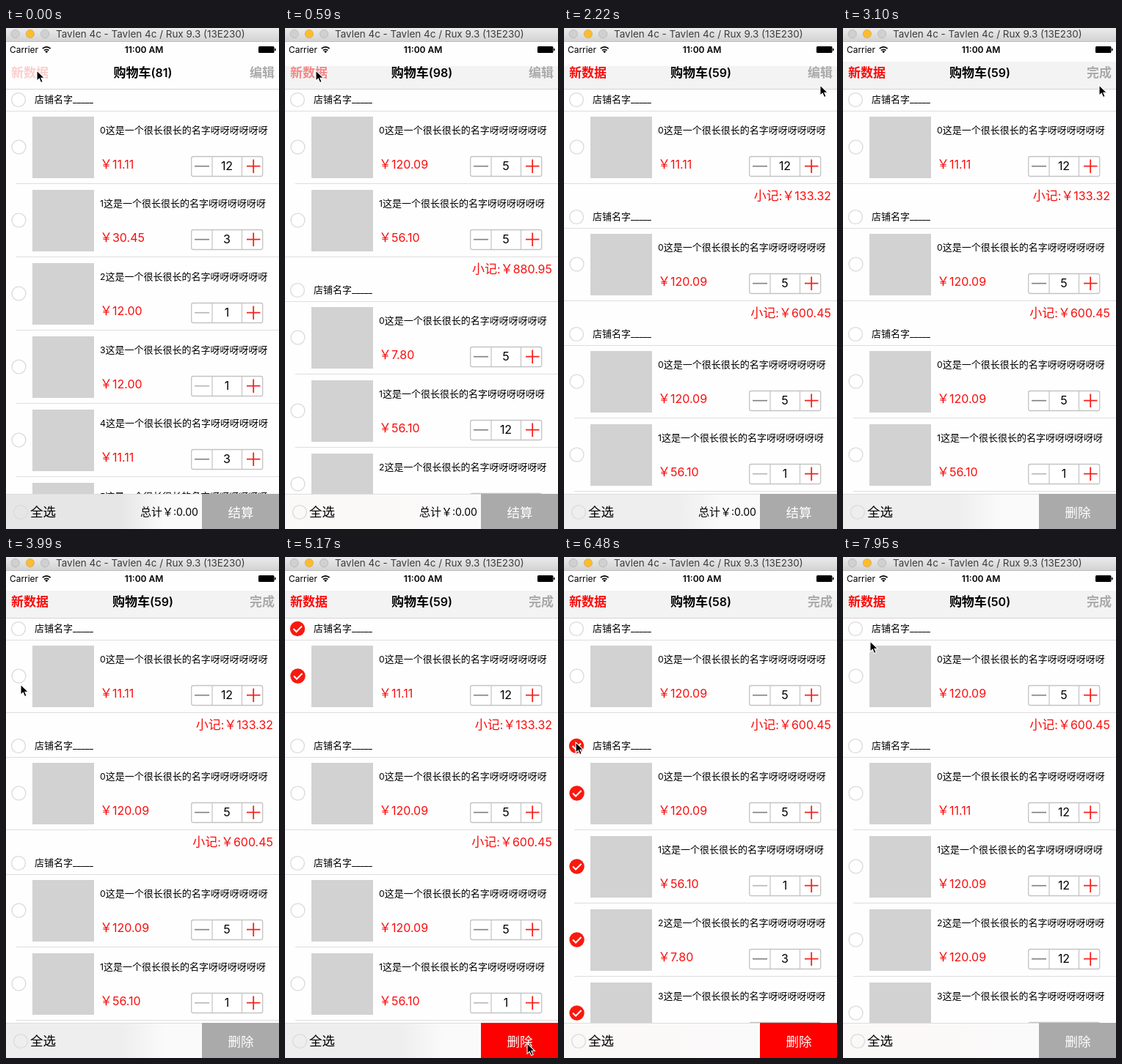
Write an HTML page that moves like this. It is 372 px wide and 684 px high and loops after 8000 ms.

```html
<!DOCTYPE html>
<html lang="zh-CN">
<head>
<meta charset="utf-8">
<title>购物车</title>
<style>
html, body { margin: 0; width: 100%; height: 100%; overflow: hidden; background: #fff; }
svg { display: block; font-family: Inter, "Noto Sans CJK SC", "Noto Sans CJK", sans-serif; }
text { white-space: pre; }
</style>
</head>
<body>
<svg id="stage" width="372" height="684" viewBox="0 0 372 684"></svg>
<script>
const LOOP = 8000, STEP = 147.4, TRAVEL = 4;
const W = 372, ROW = 100, HEAD = 30, LIST_TOP = 83, BAR_TOP = 636;
const RED = '#fb0d0d', LINE = '#dedede', PALE = '#fbf8f8';
const stage = document.getElementById('stage');

// A shop is a list of "price x quantity" items.
const shop = items => items.split(' ').map(item => item.split('x').map(Number));
const carts = [
  { count: 81, tint: '#e6e6e6', shops: ['11.11x12 30.45x3 12x1 12x1 11.11x3 7.8x5'].map(shop) },
  { count: 98, tint: PALE, shops: ['120.09x5 56.1x5', '7.8x5 56.1x12 12x3'].map(shop) },
  { count: 59, tint: '#eeeeee', shops: ['11.11x12', '120.09x5',
      '120.09x5 56.1x1 7.8x3 12x3 12x1 12x1 11.11x3 7.8x5',
      '11.11x12 120.09x12 120.09x12 12x3'].map(shop) }
];

// What the user does, and at which step.
const refreshPresses = [0, 3, 9];
const editPress = 18;
const removals = [{ check: 29, remove: 36, index: 0 }, { check: 43, remove: 50, index: 1 }];
const visits = [
  { arrive: 0, x: 42, y: 58 }, { arrive: 15, x: 349, y: 78 }, { arrive: 25, x: 20, y: 174 },
  { arrive: 33, x: 330, y: 664 }, { arrive: 41, x: 16, y: 253 }, { arrive: 48, x: 330, y: 664 },
  { arrive: 54, x: 37, y: 115 }
];

const clamp = u => Math.max(0, Math.min(1, u));
const ease = u => u * u * (3 - 2 * u);
const fadeAfter = (press, step) => step < press ? 1 : .2 + .8 * clamp((step - press) / 3);

function pointerAt(step) {
  return visits.reduce((p, { arrive, x, y }) => {
    const u = ease(clamp((step - arrive + TRAVEL) / TRAVEL));
    return arrive ? { x: p.x + (x - p.x) * u, y: p.y + (y - p.y) * u } : { x, y };
  }, {});
}

function stateAt(step) {
  const refreshes = refreshPresses.filter(press => press && step > press).length;
  let { count, tint, shops } = carts[refreshes], checked = -1;
  for (const { check, remove, index } of removals) {
    if (step >= remove) {
      count -= shops[index].length;
      shops = shops.filter((_, i) => i !== index);
      tint = PALE;
    } else if (step >= check) checked = index;
  }
  const lastPress = refreshPresses.filter(press => press <= step).pop();
  return {
    count, tint, shops, checked,
    editing: step > editPress,
    navFill: refreshes ? '#f3f3f3' : '#fefefe',
    refreshAlpha: fadeAfter(lastPress, step),
    editAlpha: fadeAfter(editPress, step),
    pointer: pointerAt(step)
  };
}

const rect = (x, y, w, h, fill, extra = '') =>
  `<rect x="${x}" y="${y}" width="${w}" height="${h}" fill="${fill}" ${extra}/>`;
const rule = (y, x = 0, color = LINE) => rect(x, y, W - x, 1, color);
const path = (d, stroke, width) =>
  `<path d="${d}" fill="none" stroke="${stroke}" stroke-width="${width}"/>`;
const gradient = (id, stops, extra = '') => `<linearGradient id="${id}" ${extra}>` +
  stops.map(([offset, color]) => `<stop offset="${offset}" stop-color="${color}"/>`).join('') +
  '</linearGradient>';

// Latin runs are set slightly smaller than the Chinese around them.
function text(x, y, size, str, { fill = '#000', anchor = 'start', weight = 400, alpha = 1 } = {}) {
  const body = str.replace(/[\x20-\x7e]+/g, run => `<tspan font-size="${size * .94}">${run}</tspan>`);
  return `<text x="${x}" y="${y}" font-size="${size}" fill="${fill}" text-anchor="${anchor}"
    font-weight="${weight}" opacity="${alpha}">${body}</text>`;
}

const ring = (x, y, fill) =>
  `<circle cx="${x}" cy="${y}" r="9.4" fill="${fill}" stroke="#dcdcdc" stroke-width="1.4"/>`;

function tick(x, y, on) {
  if (!on) return ring(x, y, '#fff');
  return `<circle cx="${x}" cy="${y}" r="10.2" fill="#f9190f"/>` +
    path(`M${x - 5.5} ${y}l4 4l7.5 -7.5`, '#fff', 2);
}

function stepper(y, quantity) {
  const mid = y + 13.7;
  return rect(252.7, y + .5, 97, 27, '#fff', 'rx="2.5" stroke="#c4c4c4" stroke-width="1.3"') +
    path(`M281 ${y}v28M321.5 ${y}v28`, '#c4c4c4', 1.2) +
    path(`M257 ${mid}h20`, quantity > 1 ? '#858585' : '#b8b8b8', 1.7) +
    path(`M328 ${mid}h18.5M337.2 ${mid - 9.2}v18.5`, '#f5221d', 1.8) +
    text(301, y + 19, 17, String(quantity), { anchor: 'middle' });
}

function itemRow(y, index, [price, quantity], on, last) {
  return tick(17.5, y + 49.5, on) +
    rect(36, y + 8, 84, 84, '#d2d2d2') +
    text(128, y + 31, 13, index + '这是一个很长很长的名字' + '呀'.repeat(6)) +
    text(128, y + 79, 17, '￥' + price.toFixed(2), { fill: RED }) +
    stepper(y + 62, quantity) +
    rule(y + ROW - 1, last ? 0 : 14);
}

function cartList(shops, checked) {
  let y = LIST_TOP, out = '';
  shops.forEach((items, s) => {
    const on = s === checked;
    out += tick(17, y + 15, on) + text(39, y + 19, 13, '店铺名字_____') + rule(y + HEAD);
    y += HEAD;
    items.forEach((item, i) => {
      out += itemRow(y, i, item, on, i === items.length - 1);
      y += ROW;
    });
    const sum = items.reduce((total, [price, quantity]) => total + price * quantity, 0);
    out += text(364, y + 22, 17, '小记:￥' + sum.toFixed(2), { fill: RED, anchor: 'end' });
    y += HEAD;
  });
  return out;
}

function windowBar() {
  const lights = ['#d0d0d0', '#fdbc2e', '#d0d0d0'].map((fill, i) =>
    `<circle cx="${12.7 + 20.2 * i}" cy="8" r="5.7" fill="${fill}" stroke="#000" stroke-opacity=".12"/>`);
  return gradient('chrome', [[0, '#ebebeb'], [1, '#d3d3d3']], 'x2="0" y2="1"') +
    rect(0, 0, W, 18, 'url(#chrome)') + rule(18, 0, '#bdbdbd') + lights.join('') +
    text(68, 13, 14.3, 'Tavlen 4c - Tavlen 4c / Rux 9.3 (13E230)', { fill: '#3c3c3c' });
}

function statusBar() {
  return text(5, 33.5, 12.7, 'Carrier') +
    path('M49.8 28.2a7.6 7.6 0 0 1 10.8 0M52 30.6a4.6 4.6 0 0 1 6.4 0', '#000', 1.7) +
    '<path d="M55.2 34.2l-2 -2.2a2.9 2.9 0 0 1 4 0z"/>' +
    text(188, 33.5, 12.8, '11:00 AM', { anchor: 'middle', weight: 600 }) +
    rect(344, 25, 21.5, 9, '#000', 'rx="1.5"') + rect(366, 27.8, 1.6, 3.4, '#000', 'rx=".8"');
}

function navBar({ count, editing, navFill, refreshAlpha, editAlpha }) {
  const top = editing ? 46 : 52;
  return rect(0, 19, W, LIST_TOP - 19, '#fefefe') + rect(0, top, W, LIST_TOP - top, navFill) +
    rule(LIST_TOP, 0, '#d4d4d4') + statusBar() +
    text(7, 67, 17, '新数据', { fill: '#fb0808', weight: 600, alpha: refreshAlpha }) +
    text(186.5, 67, 17, `购物车(${count})`, { anchor: 'middle', weight: 600 }) +
    text(366, 67, 17, editing ? '完成' : '编辑',
      { fill: '#aaa', weight: 600, anchor: 'end', alpha: editAlpha });
}

function bottomBar({ tint, editing, checked }) {
  return gradient('tint', [[.42, tint], [.58, '#fbfafa']]) +
    rect(0, BAR_TOP, W, 48, 'url(#tint)') + rule(BAR_TOP) +
    ring(20, 661, 'none') + text(33, 667, 17.5, '全选') +
    (editing ? '' : text(262, 666, 15, '总计￥:0.00', { anchor: 'end' })) +
    rect(267, BAR_TOP, 105, 48, checked >= 0 ? '#fe0000' : '#aaa') +
    text(320, 667.5, 17.5, editing ? '删除' : '结算', { fill: '#fff', anchor: 'middle' });
}

function cursor({ x, y }) {
  const arrow = 'M0 0V14.2L3.3 11.2L5.6 16.6L8.2 15.5L5.9 10.2H10.3Z';
  return `<path d="${arrow}" transform="translate(${x} ${y})" stroke="#fff" stroke-width="1.1"/>`;
}

function draw(step) {
  const state = stateAt(step);
  stage.innerHTML = rect(0, 0, W, 684, '#fefefe') + cartList(state.shops, state.checked) +
    windowBar() + navBar(state) + bottomBar(state) + cursor(state.pointer);
}

let shown = -1;
function frame() {
  const step = Math.min(54, Math.floor((performance.now() % LOOP + 10) / STEP));
  if (step !== shown) draw(shown = step);
  requestAnimationFrame(frame);
}
frame();
</script>
</body>
</html>
```
